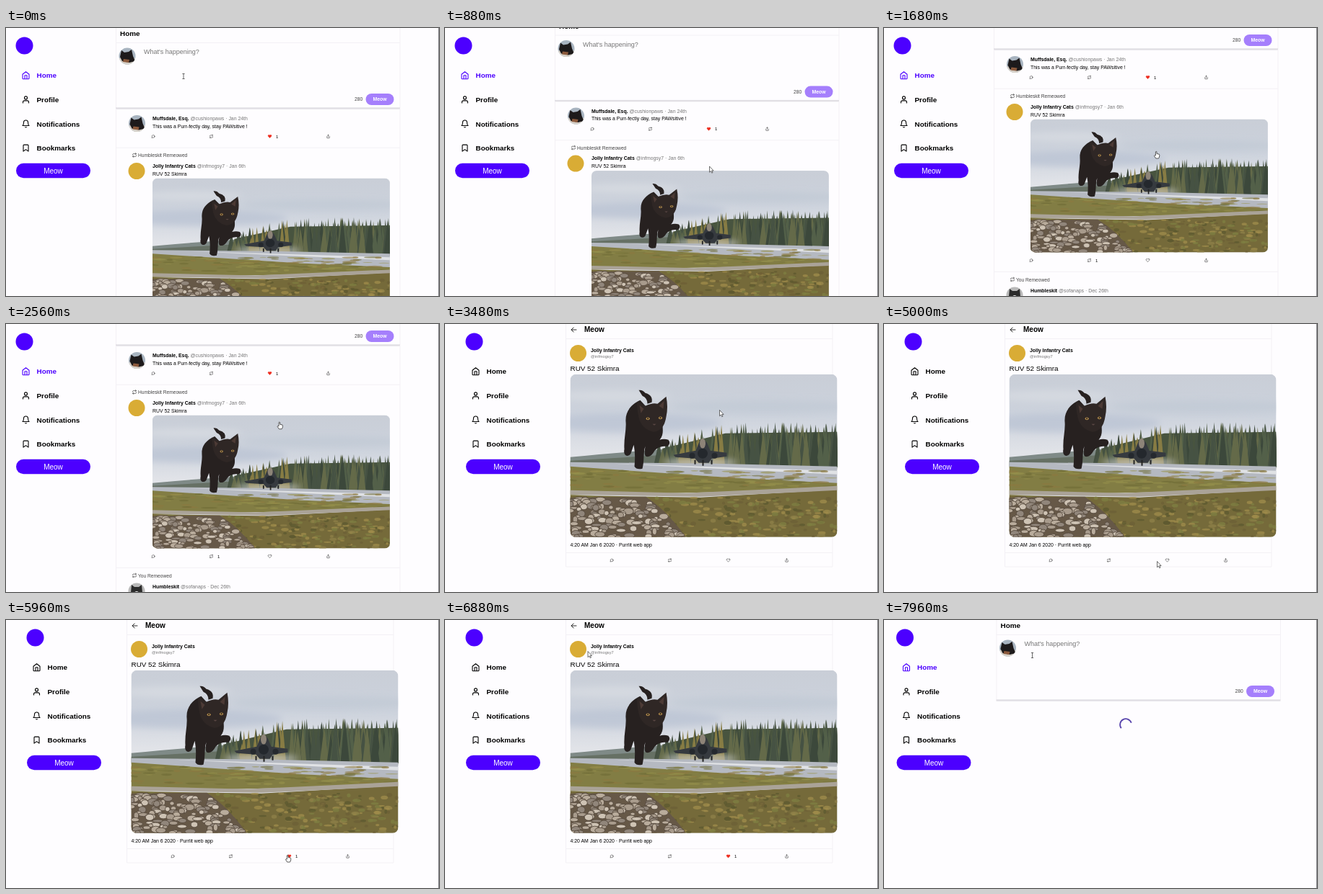
An HTML page for the animation above (8 s loop, 600 by 372 pixels).

```html
<!DOCTYPE html>
<html lang="en">
<head>
<meta charset="utf-8">
<style>
html, body { margin: 0; width: 100%; height: 100%; overflow: hidden; background: #fefdff; }
svg { display: block; font-family: "Liberation Sans", Arial, sans-serif; font-size: 6.9px; }
.muted { fill: #777; }
.bold { font-weight: bold; }
.nav { font-size: 9.9px; font-weight: bold; fill: currentColor; }
.line { stroke: #f3f1f5; fill: none; }
</style>
</head>
<body>
<svg id="stage" width="600" height="372" viewBox="0 0 600 372"></svg>
<script>
const VIOLET = '#4c00ff', LOOP = 8000;
const OPEN_POST = 2760, POST_READY = 3300, LIKE = 5400, GO_HOME = 7420;

const icons = {
  home: 'M3 9l9-7 9 7v11a2 2 0 0 1-2 2H5a2 2 0 0 1-2-2zM9 22V12h6v10',
  user: 'M20 21v-2a4 4 0 0 0-4-4H8a4 4 0 0 0-4 4v2M8 7a4 4 0 1 0 8 0a4 4 0 1 0-8 0',
  bell: 'M18 8A6 6 0 0 0 6 8c0 7-3 9-3 9h18s-3-2-3-9M13.7 21a2 2 0 0 1-3.4 0',
  mark: 'M19 21l-7-5-7 5V5a2 2 0 0 1 2-2h10a2 2 0 0 1 2 2z',
  reply: 'M21 11.5a8.4 8.4 0 0 1-9 8.4 8.5 8.5 0 0 1-3.8-.9L3 21l1.9-5.7A8.4 8.4 0 1 1 21 11.5z',
  repeat: 'M17 1l4 4-4 4M3 11V9a4 4 0 0 1 4-4h14M7 23l-4-4 4-4M21 13v2a4 4 0 0 1-4 4H3',
  heart: 'M20.8 4.6a5.5 5.5 0 0 0-7.8 0L12 5.7l-1-1.1a5.5 5.5 0 0 0-7.8 7.8L12 21.2l8.8-8.8a5.5 5.5 0 0 0 0-7.8z',
  share: 'M4 12v8a2 2 0 0 0 2 2h12a2 2 0 0 0 2-2v-8M16 6l-4-4-4 4M12 2v13',
  back: 'M20 12H4M11 5l-7 7 7 7'
};

let seed = 7;
const random = (min, max) => {
  seed = seed * 16807 % 2147483647;
  return min + (max - min) * seed / 2147483647;
};
const pick = colors => colors[random(0, colors.length) | 0];
const repeat = (count, make) => Array.from({ length: count }, (_, i) => make(i)).join('');
const text = (x, y, content, attrs = '') => `<text x="${x}" y="${y}" ${attrs}>${content}</text>`;
const rect = (x, y, w, h, fill, r = 0) => `<rect x="${x}" y="${y}" width="${w}" height="${h}" rx="${r}" fill="${fill}"/>`;
const path = (d, fill, attrs = '') => `<path d="${d}" fill="${fill}" ${attrs}/>`;
const circle = (x, y, r, fill) => `<circle cx="${x}" cy="${y}" r="${r}" fill="${fill}"/>`;
const ellipse = (x, y, rx, ry, fill, attrs = '') =>
  `<ellipse cx="${x}" cy="${y}" rx="${rx}" ry="${ry}" fill="${fill}" ${attrs}/>`;
const line = d => `<path class="line" d="${d}"/>`;
const icon = (name, x, y, size, color = '#222', fill = 'none') =>
  path(icons[name], fill, `transform="translate(${x - size / 2} ${y - size / 2}) scale(${size / 24})"
    stroke="${color}" stroke-width="2.2" stroke-linecap="round" stroke-linejoin="round"`);
const use = (id, x, y, scale = '1') => `<use href="#${id}" transform="translate(${x} ${y}) scale(${scale})"/>`;

function scenery() {
  const trees = repeat(150, () => {
    const x = random(122, 374), w = random(4, 7);
    const top = (x < 215 ? 99 - (x - 120) * .27 : 73) + random(-7, 12);
    const autumn = x > 150 && x < 215 && random(0, 1) < .45;
    const color = autumn ? '#877c44' : pick(['#465243', '#536049', '#3c483b', '#646a49']);
    return path(`M${x} ${top}L${x + w} 129H${x - w}z`, color);
  });
  const verge = repeat(110, () =>
    ellipse(random(0, 370), random(134, 158), random(4, 14), random(.6, 1.8), pick(['#98934e', '#6f6c36', '#8c7840']), 'opacity=".6"'));
  const tufts = repeat(330, () =>
    ellipse(random(0, 370), random(171, 226), random(2, 6), random(1, 3), pick(['#8f8048', '#5d582f', '#a08c4b', '#6d5f36', '#7f7f42']), 'opacity=".75"'));
  const rocks = repeat(130, i => {
    const y = 173 + i * .42;
    return ellipse(random(-2, 105 + (y - 172)), y, random(3, 7.5), random(2, 4.8),
      pick(['#b9ac9c', '#cec3b4', '#91867b', '#a89b8c']), 'stroke="#55493d" stroke-width=".9"');
  });
  return `${rect(0, 0, 370, 226, 'url(#sky)')}
    <g filter="url(#soft)">${ellipse(80, 68, 130, 13, '#b4bfd0', 'opacity=".6"')}
      ${ellipse(270, 45, 130, 9, '#bcc5d2', 'opacity=".5"')}${ellipse(60, 30, 80, 8, '#dddfe4', 'opacity=".6"')}</g>
    ${path('M0 115Q60 109 130 104L200 98V130H0z', '#7f8a87')}${path('M0 120L130 112V128H0z', '#667064')}
    ${path('M128 103L215 82L370 80V132H130z', '#48543f')}${trees}
    <g filter="url(#soft)">${ellipse(180, 123, 52, 6, '#d9dbdd', 'opacity=".7"')}</g>
    ${path('M0 122L200 124L370 128V152L230 144L0 129z', '#b5b9c1')}${path('M60 124L370 134V139z', '#e0e2e5')}
    ${path('M0 128L230 144L370 151V160L0 168z', '#827d44')}${verge}
    ${path('M0 168L180 171L370 160V226H0z', '#756a3a')}${tufts}
    ${path('M0 171L105 170Q135 190 160 226H0z', '#665847')}${rocks}
    ${path('M0 161L160 165L370 155V161L180 170L0 167z', '#aaa398')}`;
}

function photo() {
  const cat =
    path('M95 22q5-1 9 4q11 3 9 13l-6 2q0-8-7-11z', '#272120') +
    path('M97 36C84 42 76 52 77 66C78 78 74 90 75 104C73 113 80 116 84 110L88 98C90 108 90 118 89 128Q92 133 100 131C103 120 101 108 104 100Q102 113 105 114Q112 116 117 106C123 100 128 100 135 100Q140 96 136 91Q130 89 124 91C130 84 128 76 128 70z', '#272120') +
    path('M93 38L104 44Q114 39 121 41L133 31Q136 46 133 59Q130 79 115 80Q99 76 95 60Q92 47 93 38z', '#2f2725') +
    path('M96 43l6 5l-4 6zM130 37l-1 11l-6-4z', '#4c3a35') +
    ellipse(107.6, 61.5, 2.5, 1.9, '#b48c4c') + ellipse(125, 60.5, 2.5, 1.9, '#b48c4c') +
    circle(107.6, 61.5, 1, '#151515') + circle(125, 60.5, 1, '#151515') + path('M114 69h5l-2.5 2z', '#5b4744');
  const jet =
    path('M143 112L174 106L178 96Q183 85 190 96L194 106L217 109V114L196 117L192 123H178L173 117L146 115z', '#363a3f') +
    ellipse(183.5, 96, 4, 7, '#8d8478') + circle(183.5, 110, 7, '#24282d') +
    circle(169, 113, 4, '#25292e') + circle(200, 113, 4, '#25292e') +
    path('M173 119v6M184 119v8M196 119v6', 'none', 'stroke="#222" stroke-width="2"');
  return `<g id="photo" clip-path="url(#frame)">${scenery()}${jet}${cat}</g>`;
}

function defs() {
  return `<defs>
    <linearGradient id="sky" x2="0" y2="1"><stop stop-color="#c9ced7"/><stop offset=".25" stop-color="#ccd2dc"/><stop offset=".48" stop-color="#e1e3e8"/></linearGradient>
    <filter id="soft" x="-20%" y="-60%" width="140%" height="220%"><feGaussianBlur stdDeviation="5"/></filter>
    <clipPath id="frame"><rect width="370" height="226" rx="8"/></clipPath>
    <clipPath id="round"><circle r="11.5"/></clipPath>
    <g id="blackCat" clip-path="url(#round)">${rect(-12, -12, 24, 24, '#a8b4c0')}${rect(-12, 3, 24, 9, '#d5d0c8')}
      ${path('M-8 -8L-4 -5L2 -6L6 -9L8 0L11 7L3 9L-7 7L-10 1z', '#1d1a1b')}${path('M-5 4L3 5L2 9L-6 8z', '#8c5a3c')}</g>
    <g id="greyCat" clip-path="url(#round)">${rect(-12, -12, 24, 24, '#b9b9b9')}${path('M-7 -9L-3 -6H3L7 -9L9 12H-9z', '#2b2b2b')}${ellipse(0, 5, 4, 5, '#eee')}</g>
    <g id="arrow">${path('M0 0V8.2L1.9 6.5L3.2 9.2L4.5 8.6L3.2 6H5.6z', '#fff', 'stroke="#333" stroke-width=".7"')}</g>
    <g id="hand">${path('M-1.6 1V-4.2Q-.8 -5.2 0 -4.2V-1.5L3.3 -.8Q4.2 0 3.5 3L2.5 5H-1.3L-3.6 1.5Q-3.5 .2 -1.6 1z', '#fff', 'stroke="#333" stroke-width=".8"')}</g>
    <g id="beam">${path('M-1.6 -3.5H1.6M0 -3.5V3.5M-1.6 3.5H1.6', 'none', 'stroke="#444" stroke-width=".8"')}</g>
    ${photo()}</defs>`;
}

const byline = (y, name, handle, date) =>
  text(203, y, `<tspan class="bold">${name}</tspan> <tspan class="muted">${handle} · ${date}</tspan>`);
const remeow = (y, who) => icon('repeat', 178, y - 2.5, 6.5) + text(183, y, who + ' Remeowed', 'fill="#444" font-size="6.65"');
const actions = (x, y) => icon('reply', x, y, 5.5) + icon('repeat', x + 80.5, y, 5.5) + icon('share', x + 242.5, y, 5.5);
const redHeart = (x, y) => icon('heart', x, y, 5.5, '#ee2a1c', '#ee2a1c') + text(x + 8.5, y + 2.3, '1', 'font-size="6"');

function sidebar() {
  const items = [['home', 'Home'], ['user', 'Profile'], ['bell', 'Notifications'], ['mark', 'Bookmarks']];
  return `<g id="sidebar">${circle(25.5, 24.5, 12, VIOLET)}` +
    items.map(([name, label], i) => `<g id="nav-${name}">${icon(name, 27.5, 65.8 + i * 33.6, 12, 'currentColor')}
      ${text(42.5, 69.3 + i * 33.6, label, 'class="nav"')}</g>`).join('') +
    rect(14, 187.7, 103, 20.5, VIOLET, 10.2) +
    text(65.5, 201.5, 'Meow', 'fill="#fff" font-size="10" text-anchor="middle"') + '</g>';
}

function composer() {
  return `<g id="composer">${line('M152.5 0V111M546 0V111M152 20.5H546')}
    ${text(158, 11.2, 'Home', 'class="bold" font-size="9.9"')}${use('blackCat', 168, 39)}
    ${text(191, 36, 'What\'s happening?', 'font-size="9" fill="#757575"')}
    ${text(483, 101.2, '280', 'font-size="6.7" fill="#444"')}
    ${rect(498.5, 91, 39, 16, '#a57ffc', 8)}
    ${text(518, 101.3, 'Meow', 'class="bold" fill="#fff" text-anchor="middle"')}
    ${rect(152, 110.3, 394, 2.4, '#e1dfe4')}</g>`;
}

function feed() {
  return `<g id="feed">${line('M152.5 112V470M546 112V470M152 166.2H546M152 420.3H546')}
    ${use('blackCat', 181.5, 132.5)}${byline(128.3, 'Muffsdale, Esq.', '@cushionpaws', 'Jan 24th')}
    ${text(203, 138.8, 'This was a Purr-fectly day, stay PAWsitive !')}
    ${actions(204, 150.5)}${redHeart(365.5, 150.5)}
    ${remeow(179, 'Humbleskit')}${circle(181, 198.5, 11.5, '#d9ac35')}
    ${byline(193.8, 'Jolly Infantry Cats', '@infmogsy7', 'Jan 6th')}${text(203, 204.6, 'RUV 52 Skimra')}
    ${use('photo', 203, 208.5, '.889 .8186')}
    ${actions(204, 404.5)}${icon('heart', 365.5, 404.5, 5.5)}${text(293, 406.8, '1', 'font-size="6"')}
    ${remeow(433.5, 'You')}${use('greyCat', 181, 453)}${byline(448.5, 'Humbleskit', '@sofanaps', 'Dec 26th')}</g>`;
}

function post() {
  return `<g id="postHeader">${line('M167 20.5H537')}${icon('back', 178.5, 8, 10.5)}
      ${text(193, 11.2, 'Meow', 'class="bold" font-size="10"')}</g>
    <g id="post">${line('M167.5 0V337H537V0M167 317.5H537')}
    ${circle(184.5, 40.5, 11.5, '#d9ac35')}${text(202, 39, 'Jolly Infantry Cats', 'class="bold"')}
    ${text(202, 46.5, '@infmogsy7', 'class="muted" font-size="5.7"')}
    ${text(173.5, 65, 'RUV 52 Skimra', 'font-size="9.9"')}${use('photo', 173.5, 69.8)}
    ${text(173.5, 308.5, '4:20 AM Jan 6 2020 · Purrlit web app')}${actions(231, 328)}
    <g id="unliked">${icon('heart', 392.5, 328, 5.5)}</g><g id="liked">${redHeart(392.5, 328)}</g></g>`;
}

const $ = id => document.getElementById(id);
$('stage').innerHTML = defs() + sidebar() + composer() + feed() + post() +
  path('M-6.2 5.2A8 8 0 1 1 7.7 -2.2', 'none', 'id="spinner" stroke="#5946ad" stroke-width="1.8"') +
  rect(599, 0, 1, 372, '#85838a') + '<use id="pointer"/>';

// time, x, y, pointer shape from then on
const pointerKeys = [
  [0, 246, 67, 'beam'], [160, 246, 67, 'beam'], [400, 296, 116, 'arrow'], [760, 366.5, 192, 'arrow'],
  [900, 366.5, 192, 'arrow'], [1200, 378, 176, 'hand'], [2350, 378, 176, 'hand'],
  [2700, 380.5, 122, 'hand'], [OPEN_POST, 380.5, 119.5, 'arrow'], [4250, 380.5, 119.5, 'arrow'],
  [4850, 378.5, 329.5, 'arrow'], [5080, 378.5, 329.5, 'arrow'], [5250, 391, 331, 'hand'],
  [6150, 391, 331, 'arrow'], [6820, 198, 43.5, 'arrow'], [6980, 198, 43.5, 'arrow'],
  [7240, 178, 10, 'hand'], [GO_HOME, 178, 10, 'arrow'], [7540, 182, 16, 'beam'], [7840, 205.5, 49, 'beam'],
  [LOOP, 205.5, 49, 'beam']
];

const smooth = (t, start, end) => {
  const u = Math.min(1, Math.max(0, (t - start) / (end - start)));
  return u * u * (3 - 2 * u);
};
const move = (id, x, y, extra = '') => $(id).setAttribute('transform', `translate(${x} ${y}) ${extra}`);
const show = (id, visible) => $(id).setAttribute('display', visible ? 'inline' : 'none');

function draw(t) {
  const onFeed = t < OPEN_POST, onPost = !onFeed && t < GO_HOME, returning = t >= GO_HOME;
  const postReady = onPost && t >= POST_READY;
  const scroll = returning ? 0 : 82 * smooth(t, 803, 1153);
  const shift = returning ? 3.5 : 0;

  move('sidebar', onPost ? 15 : shift, 0);
  $('nav-home').style.color = onPost ? '#000' : VIOLET;
  move('composer', shift, -scroll);
  move('feed', 0, -scroll);
  show('composer', !onPost);
  show('feed', onFeed);
  show('postHeader', onPost);
  show('post', postReady);
  show('liked', t >= LIKE);
  show('unliked', t < LIKE);
  show('spinner', returning || onPost && !postReady);
  move('spinner', 335, returning ? 145 : 54, `rotate(${(t - 7960) / 1400 * 360})`);

  const i = pointerKeys.findLastIndex(key => key[0] <= t);
  const [start, x, y, shape] = pointerKeys[i];
  const [end, nextX, nextY] = pointerKeys[i + 1];
  const u = smooth(t, start, end);
  $('pointer').setAttribute('href', '#' + shape);
  move('pointer', x + (nextX - x) * u, y + (nextY - y) * u);
}

const begin = performance.now();
function tick() {
  draw((performance.now() - begin) % LOOP);
  requestAnimationFrame(tick);
}
tick();
</script>
</body>
</html>
```
